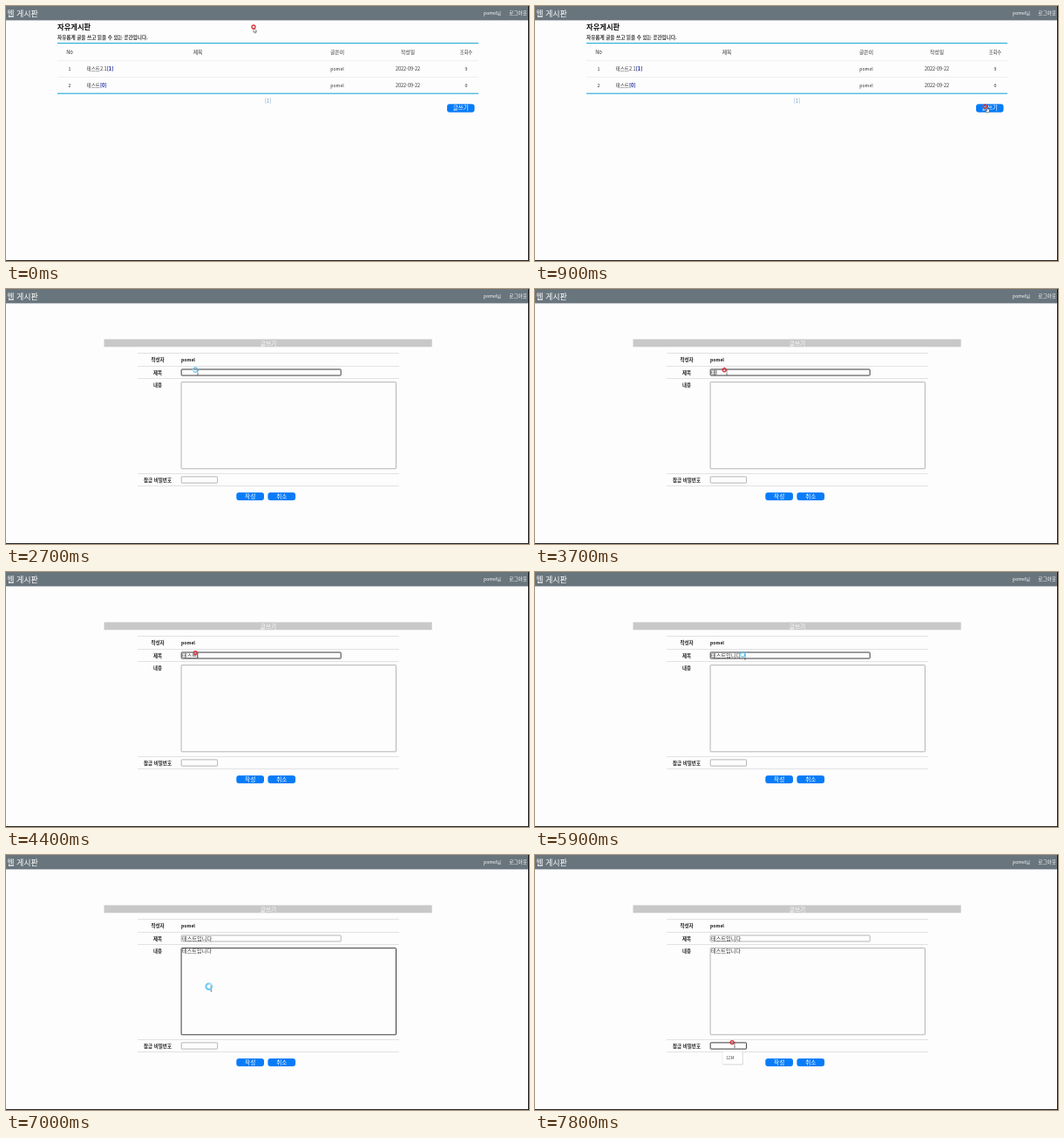
An HTML page for the animation above (8000 ms loop, 600 by 292 pixels).

```html
<!DOCTYPE html>
<html lang="ko">
<head>
<meta charset="utf-8">
<style>
  html, body { margin: 0; width: 100%; height: 100%; overflow: hidden; background: #fdfdfe; }
  svg { display: block; width: 600px; height: 292px; }
  text { font-family: 'Noto Sans CJK KR', 'Noto Sans CJK', 'Noto Sans', sans-serif; white-space: pre; }
</style>
</head>
<body>
<svg id="stage" viewBox="0 0 600 292"></svg>
<script>
const LOOP = 8000, STEP = 100;
const USER = 'pomel', PHRASE = '테스트입니다';
const PAPER = '#fdfdfe', TEAL = '#35b0d6', BLUE = '#087cf8';
const stage = document.getElementById('stage');

const rect = (x, y, w, h, fill, more = '') =>
  `<rect x="${x}" y="${y}" width="${w}" height="${h}" fill="${fill}" ${more}/>`;
const text = (x, y, size, str, { fill = '#333', weight = 400, anchor = 'start' } = {}) =>
  `<text x="${x}" y="${y}" font-size="${size}" fill="${fill}" font-weight="${weight}" text-anchor="${anchor}">${str}</text>`;
const mid = (x, y, size, str, opts) => text(x, y, size, str, { anchor: 'middle', ...opts });
const button = (x, y, w, h, label) =>
  rect(x, y, w, h, BLUE, 'rx="3"') + mid(x + w / 2, y + h / 2 + 2.4, 6.6, label, { fill: '#fff' });
const group = (id, body) => `<g id="${id}">${body}</g>`;
const field = (id, x, y, w, h) => rect(x, y, w, h, PAPER, `id="${id}" rx="0.6"`);

const header =
  rect(0, 0, 600, 16.4, '#69757d') +
  text(1.2, 11.9, 9, '웹 게시판', { fill: '#fff' }) +
  text(548, 10.3, 5.1, USER + '님', { fill: '#fff' }) +
  text(577.3, 10.3, 5.6, '로그아웃', { fill: '#fff' }) +
  rect(599, 0, 1, 292, '#111') + rect(0, 291, 600, 1, '#222');

const columns = [73, 220, 380, 461, 528];
const row = (y, no, title, count, hits) =>
  mid(columns[0], y, 5.3, no) +
  text(92.5, y, 5.6, `${title}<tspan fill="#1c2a9c" font-weight="700">[${count}]</tspan>`) +
  mid(columns[2], y, 5.2, USER) +
  mid(columns[3], y, 5.5, '2022-09-22') +
  mid(columns[4], y, 5.3, hits);

const list =
  text(59, 27.4, 8.3, '자유게시판', { weight: 700, fill: '#111' }) +
  text(59, 38.4, 5.6, '자유롭게 글을 쓰고 읽을 수 있는 공간입니다.', { weight: 700, fill: '#333' }) +
  rect(59, 42, 483, 1.2, TEAL) +
  ['No', '제목', '글쓴이', '작성일', '조회수'].map((s, i) => mid(columns[i], 55.2, i == 4 ? 5.2 : 5.8, s)).join('') +
  rect(59, 62.5, 483, 0.6, '#e6e6e8') +
  row(74.2, '1', '테스트2.1', 1, '9') +
  rect(59, 81, 483, 0.6, '#e6e6e8') +
  row(93.2, '2', '테스트', 0, '0') +
  rect(59, 99.6, 483, 1.2, TEAL) +
  mid(300.5, 110.6, 6.2, '[1]', { fill: '#7aa5cc' }) +
  button(506, 112.2, 31.5, 9.6, '글쓰기');

const labels = [[82.8, '작성자'], [97.6, '제목'], [112.2, '내용'], [220.6, '잠금 비밀번호']];
const form =
  rect(112.5, 57.5, 376.2, 8.8, '#c8c8c9') +
  mid(301, 64.6, 6.7, '글쓰기', { fill: '#fff' }) +
  [73, 88, 102, 211, 225].map(y => rect(151, y, 300, 0.8, '#dcdcde')).join('') +
  labels.map(([y, s]) => mid(174, y, 5.5, s, { weight: 700, fill: '#222' })).join('') +
  text(201, 82.6, 5.1, USER, { weight: 700, fill: '#111' }) +
  field('title', 201.2, 92, 183, 7) +
  field('body', 201.1, 106.6, 246.4, 99.2) +
  field('lock', 201.2, 214.9, 41.4, 7.2) +
  rect(202, 92.6, 34.5, 5.8, '#2d7be0', 'id="mark"') +
  `<text id="titleText" x="202" y="97.7" font-size="6.2"></text>` +
  `<text id="bodyText" x="201.8" y="112.2" font-size="6.2" fill="#333"></text>` +
  rect(202, 92.8, 0.6, 5.4, '#222', 'id="caret"') +
  button(264.3, 232.9, 31.7, 9.2, '작성') +
  button(300.4, 232.9, 31.7, 9.2, '취소') +
  group('popup',
    rect(215.5, 226, 23.4, 14.6, '#ddd', 'rx="1"') +
    rect(215, 225, 23, 14.6, '#fff', 'rx="1" stroke="#ddd" stroke-width="0.5"') +
    text(219.3, 233.9, 4.2, '1234'));

const status = rect(0, 287, 35.5, 5, '#dcdfe2', 'stroke="#bbb" stroke-width="0.4"') +
  text(0.5, 290.9, 3.8, 'localhost:write.php', { fill: '#666' });

const pointer =
  `<path id="arrow" d="M0 0V5.4L1.3 4.3L2.2 6.2L3 5.8L2.2 4H3.9Z" fill="#fff" stroke="#333" stroke-width=".5"/>` +
  `<path id="hand" d="M-.6-2.4Q0-3 .6-2.4V0L2.3.5V2.5L1.6 4H-1L-2.4 1.3L-.6 1.7Z" fill="#fff" stroke="#333" stroke-width=".6"/>` +
  `<path id="beam" d="M-1-2.6H1M0-2.6V2.6M-1 2.6H1" fill="none" stroke="#555" stroke-width=".6"/>` +
  `<g id="ring"><circle id="halo" fill="none"/><circle id="spin" fill="none" stroke="#c4ebfa" stroke-width="1.2"/></g>`;

stage.innerHTML = rect(0, 0, 600, 292, PAPER) + group('list', list) + group('form', form) +
  group('status', status) + header + group('pointer', pointer);

const el = Object.fromEntries([...stage.querySelectorAll('[id]')].map(n => [n.id, n]));
const show = (id, on) => el[id].setAttribute('visibility', on ? 'inherit' : 'hidden');
const set = (id, attrs) => Object.entries(attrs).forEach(([k, v]) => el[id].setAttribute(k, v));

// time, x, y of the pointer's hot spot
const path = [
  [0, 284, 25], [900, 519, 118], [1100, 522, 122.5], [1500, 522, 122.5], [1800, 418, 112],
  [2400, 220, 95.5], [5400, 220, 95.5], [5800, 241, 97.5], [5900, 241, 97.5], [6300, 178, 98],
  [6600, 226, 120], [7000, 235.5, 153.5], [7200, 231, 200], [7500, 229, 217.5], [8000, 229, 217.5]
];
const typing = [
  [0, ''], [3300, 'ㅌ'], [3700, '테'], [3900, '테ㅅ'], [4000, '테스'], [4200, '테스ㅌ'],
  [4400, '테스트'], [4600, '테스트이'], [4800, '테스트입'], [4900, '테스트입니'], [5000, PHRASE]
];
const looks = [[0, 'red'], [1200, 'busy'], [1600, 'cyan'], [2800, 'red'], [5500, 'cyan'], [6500, 'busy'], [7300, 'red']];
const focuses = [[0, ''], [2500, 'title'], [6500, 'body'], [7500, 'lock']];
const rings = {
  red: { r: 2, stroke: '#d8323c', 'stroke-width': 1.3 },
  cyan: { r: 2.6, stroke: '#4fc0ea', 'stroke-width': 1.1 },
  busy: { r: 3.3, stroke: '#6cc8ee', 'stroke-width': 2 }
};

const latest = (steps, t) => steps.filter(s => s[0] <= t).pop()[1];

function pointAt(t) {
  const i = Math.max(1, path.findIndex(p => p[0] > t));
  const [a, b] = [path[i - 1], path[i]];
  const k = (t - a[0]) / (b[0] - a[0]), e = k * k * (3 - 2 * k);
  return [a[1] + (b[1] - a[1]) * e, a[2] + (b[2] - a[2]) * e];
}

function drawPointer(t) {
  const [x, y] = pointAt(t);
  const look = latest(looks, t), { r } = rings[look];
  const kind = t >= 900 && t < 1700 ? 'hand'
    : t < 2300 || (t > 6100 && t < 6500) ? 'arrow' : 'beam';
  for (const k of ['arrow', 'hand', 'beam']) show(k, k === kind);
  set('pointer', { transform: `translate(${x} ${y})` });
  const [dx, dy] = kind === 'arrow' ? [0, -1] : [-2.8, -2.9];
  set('ring', { transform: `translate(${dx} ${dy}) rotate(${t * 0.45})` });
  set('halo', rings[look]);
  set('spin', { r, 'stroke-dasharray': `${r} ${r * 5.3}` });
  show('spin', look !== 'red');
}

function draw(t) {
  const writing = t >= 1300, focus = latest(focuses, t);
  show('list', !writing);
  show('form', writing);
  show('status', t >= 1000 && t < 2000);
  for (const id of ['title', 'body', 'lock']) {
    const on = id === focus;
    set(id, { stroke: on ? '#3c3c3e' : '#a4a4a6', 'stroke-width': on ? 1 : 0.8 });
  }
  const typed = latest(typing, t), marked = t >= 6100 && t < 6500;
  el.titleText.textContent = typed;
  set('titleText', { fill: marked ? '#fff' : '#333' });
  el.bodyText.textContent = t >= 6800 ? PHRASE : '';
  show('mark', marked);
  set('caret', { x: 202 + typed.length * 5.7 });
  show('caret', typed && typed !== PHRASE);
  show('popup', t >= 7600);
  drawPointer(t);
}

function tick() {
  const t = performance.now() % LOOP;
  draw(Math.floor(t / STEP) * STEP);
  requestAnimationFrame(tick);
}
tick();
</script>
</body>
</html>
```
